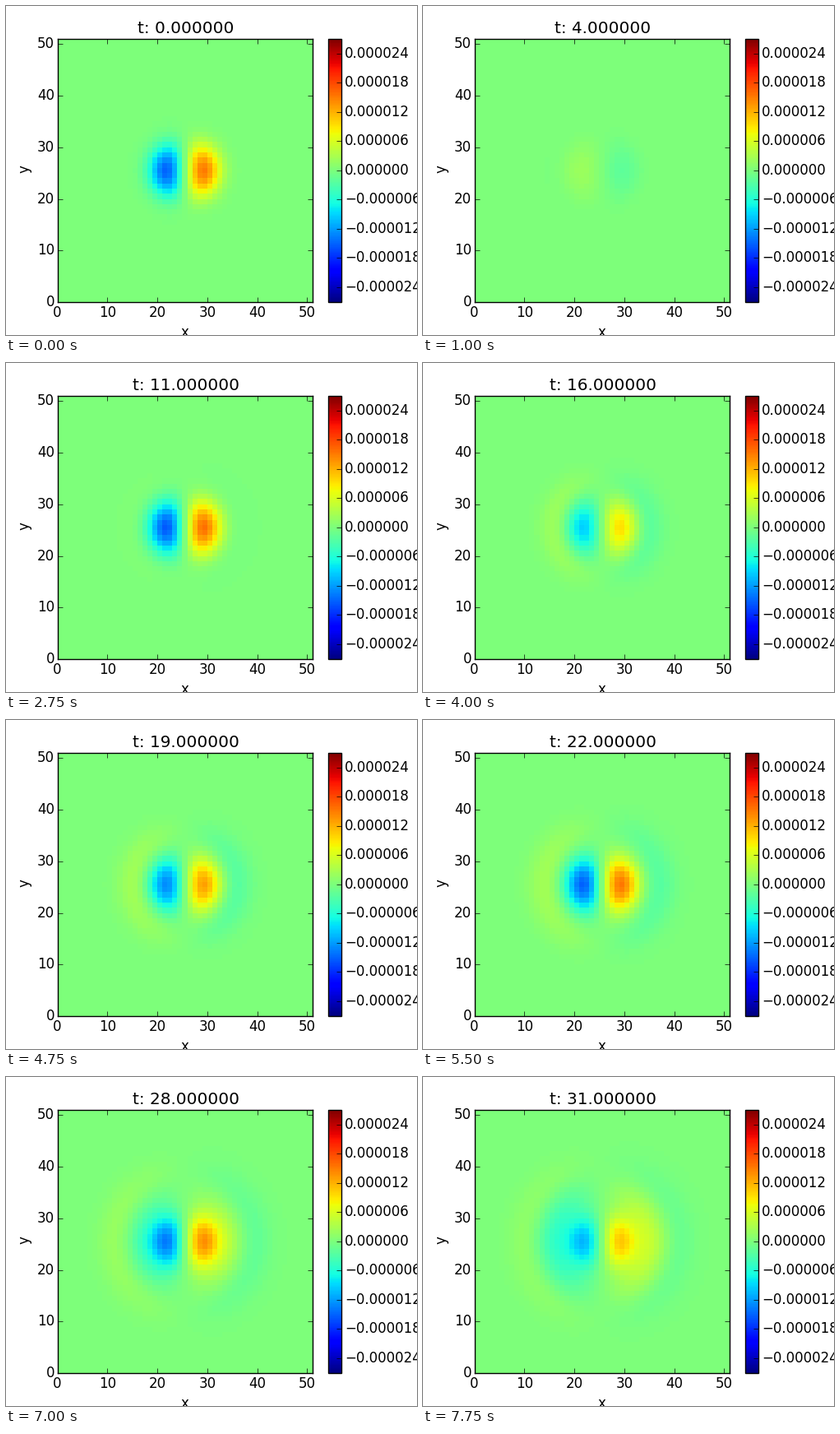
A matplotlib script that plays this animation: 500 by 400 pixels, repeating every 8 s.

```python
import matplotlib.pyplot as plt
import numpy as np
from matplotlib.animation import FuncAnimation
from matplotlib.ticker import FuncFormatter

plt.style.use("classic")
plt.rcParams["font.family"] = "DejaVu Sans"

N = 51
STEPS = 32
UNIT = 1e-6
FREQ = 0.359      # pulses per step
PEAK_STEP = 11    # a step at which the core is strongest
CORE = 3.7        # distance of each lobe from the centre, in cells

cells = np.arange(N) - N // 2
DX, DY = np.meshgrid(cells, cells)
R = np.hypot(DX, DY)
COS = DX / np.maximum(R, 1)


def pulse(turns):
    return np.cos(2 * np.pi * turns)


def field(t):
    """Pulsing dipole core inside a spreading wave that lags with radius."""
    phase = FREQ * (t - PEAK_STEP)

    height = 6.8 + 8.7 * pulse(phase)
    core = height * DX / CORE * np.exp((1 - (R / CORE) ** 2.5) / 2.5)

    front = 6 + 0.3 * t
    rise = 1 - np.exp(-(R / 8) ** 4)
    envelope = (2 + 0.13 * t) * rise / (1 + np.exp((R - front) / 1.5))
    wave = envelope * COS * pulse(phase - 0.04 * R + 0.12)

    return UNIT * (core + wave)


fig = plt.figure(figsize=(5, 4), dpi=100, facecolor="white")
ax = fig.add_axes([0.125, 0.1, 0.62, 0.8])
mesh = ax.pcolormesh(np.arange(N + 1), np.arange(N + 1), field(0),
                     cmap="jet", vmin=-2.711e-5, vmax=2.697e-5)
ax.set_xlim(0, N)
ax.set_ylim(0, N)
ax.tick_params(pad=2.6)
ax.set_xlabel("x", labelpad=4.3)
ax.set_ylabel("y", labelpad=4.3, y=0.505)
title = ax.set_title("", x=0.504)

cax = fig.add_axes([391.9 / 500, 0.1, 16 / 500, 0.8])
bar = fig.colorbar(mesh, cax=cax, ticks=np.arange(-4, 5) * 6e-6)
bar.ax.tick_params(pad=3.1)
bar.ax.yaxis.set_major_formatter(
    FuncFormatter(lambda v, _: f"{v:.6f}".replace("-", "\u2212")))


def update(t):
    mesh.set_array(field(t))
    title.set_text(f"t: {t:f}")
    return mesh, title


anim = FuncAnimation(fig, update, frames=STEPS, interval=250,
                     repeat=True, repeat_delay=0, blit=False)
plt.show()
```
